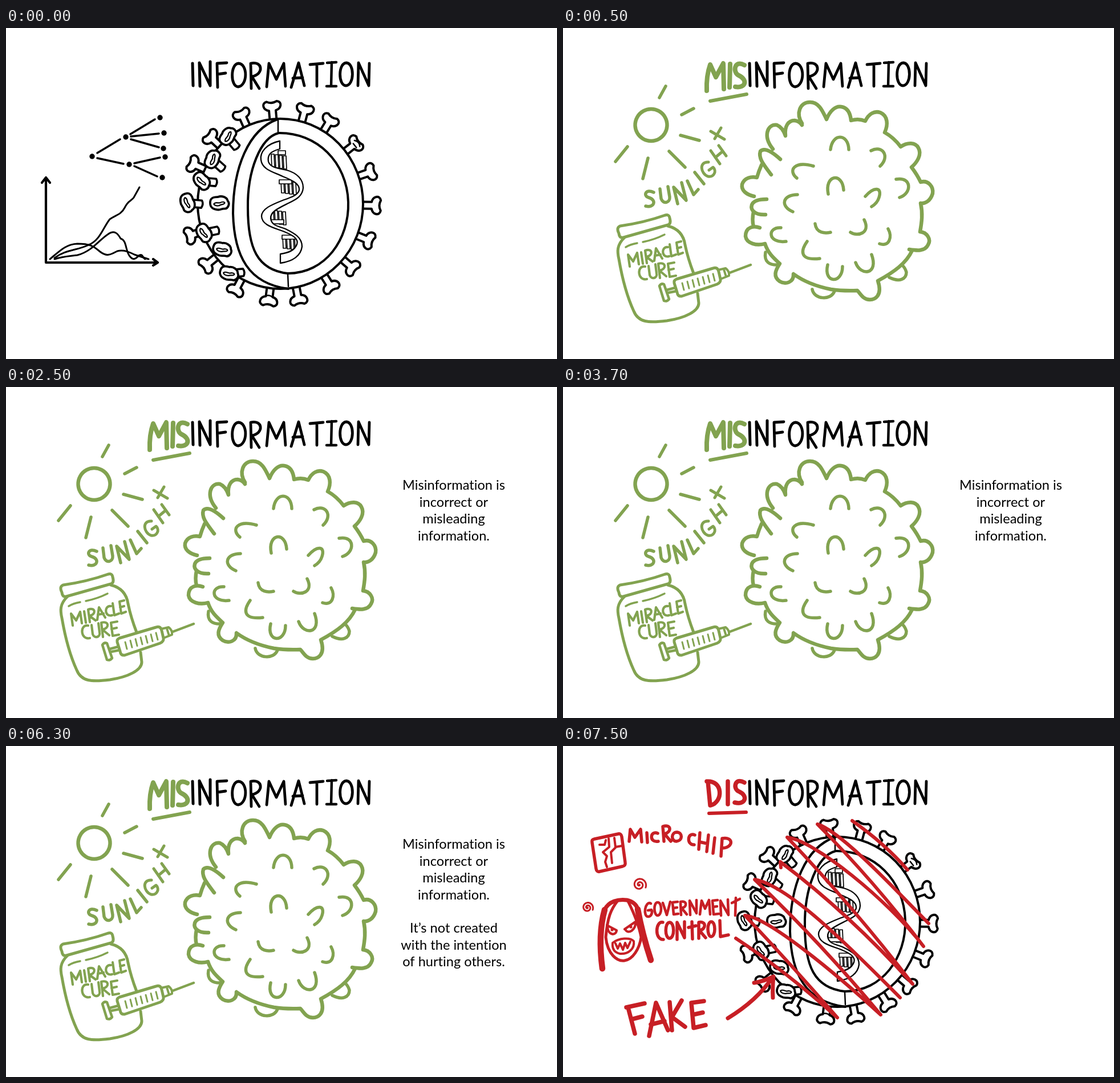
Animation, 966 px wide and 580 px high, one loop 8000 ms. Source, as an HTML page with a canvas:

```html
<!DOCTYPE html>
<html lang="en">
<head>
<meta charset="utf-8">
<title>Information, misinformation, disinformation</title>
<style>
html, body { margin: 0; width: 100%; height: 100%; overflow: hidden; background: #fff; }
canvas { display: block; width: 100vw; height: 100vh; }
</style>
</head>
<body>
<canvas id="stage" width="966" height="580" role="img" aria-label="Information, misinformation and disinformation about a virus"></canvas>
<script>
const ctx = document.getElementById('stage').getContext('2d');
const BLACK = '#000', GREEN = '#82a350', RED = '#c71f25';
const LOOP = 8000;

function ink(path, width, color = ctx.strokeStyle, filled = false) {
  const shape = new Path2D(path);
  ctx.strokeStyle = color;
  ctx.lineWidth = width;
  if (filled) {
    ctx.fillStyle = '#fff';
    ctx.fill(shape);
  }
  ctx.stroke(shape);
}

function placed(x, y, degrees, draw) {
  ctx.save();
  ctx.translate(x, y);
  ctx.rotate(degrees * Math.PI / 180);
  draw();
  ctx.restore();
}

function disc(x, y, r) {
  ctx.beginPath();
  ctx.arc(x, y, r, 0, 7);
  ctx.fill();
}

function spiral(x, y, r) {
  ctx.beginPath();
  for (let a = 0; a < 13; a += 0.2) {
    const d = r * a / 13;
    ctx.lineTo(x + d * Math.cos(a), y + d * Math.sin(a));
  }
  ctx.lineWidth = 3;
  ctx.stroke();
}

function title() {
  ink('M327 62L328 101M340 102L339 61 358 101 358 59', 5, BLACK);
  ink('M371 104L370 62 387 61M371 81L385 79', 4.8);
  ink('M408 62C393 62 393 103 407 103 424 101 424 63 408 62Z', 4.8);
  ink('M430 106L429 62C450 57 453 81 431 85L444 106', 4.8);
  ink('M457 103L461 62 474 90 487 62 490 102', 4.8);
  ink('M500 104L513 61 523 101M503 88L520 87', 4.8);
  ink('M533 64L556 62M545 63L545 102', 4.8);
  ink('M563 61L579 60M571 60L570 102M562 102L579 102', 4.4);
  ink('M597 61C582 61 582 101 596 101 611 100 611 62 597 61Z', 4.8);
  ink('M617 101L618 61 636 101 637 62', 4.8);
}

// Virus with a cutaway

const SPIKE = 'M-6 3L-6 -15C-16 -17 -19 -29 -9 -31Q0 -26 9 -31C19 -29 16 -17 6 -15L6 3';
const BEAN = 'M-16 2C-18 -7 -9 -9 -5 -10C0 -14 10 -14 13 -8C19 -4 17 6 11 7C6 8 5 12 -2 12C-10 13 -15 9 -16 2Z';
const CREASE = 'M-9 4C-7 -1 -3 1 1 -1C4 -4 8 -5 9 -3C8 1 3 1 1 4C-3 6 -7 6 -9 4Z';

function spike(degrees) {
  const a = degrees * Math.PI / 180;
  const x = 481 + 145 * Math.sin(a), y = 308 - 149 * Math.cos(a);
  placed(x, y, degrees, () => ink(SPIKE, 4, BLACK, true));
}

// A knob seen from the front; stem is the direction of its stalk, or null.
function knob(x, y, turn, stem) {
  if (stem !== null) placed(x, y, stem, () => ink('M0 -6L25 -6Q29 0 25 7L0 7', 3.6, BLACK, true));
  placed(x, y, turn, () => {
    ink(BEAN, 3.8, BLACK, true);
    ink(CREASE, 2.2);
  });
}

function rungs(x, y, count, height) {
  for (let i = 0; i < count; i++) {
    ink(`M${x + i * 7} ${y + i}l5 0 1 ${height}-5 0Z`, 1.7, BLACK, true);
  }
}

function helix() {
  rungs(465, 221, 4, 23);
  rungs(482, 267, 4, 22);
  rungs(464, 319, 4, 23);
  rungs(485, 364, 4, 22);
  ink('M477 215h13v7h-13ZM479 266h22v7h-22ZM462 336h25v7h-25ZM484 363h23v7h-23Z', 1.7, BLACK, true);
  ink('M480 198C456 203 445 218 447 231C449 248 468 252 485 260C505 268 515 274 514 284C512 293 499 297 485 302C465 310 448 317 448 330C449 346 470 350 488 357C505 364 513 370 510 379C506 390 495 394 481 396L481 412C503 409 517 399 519 383C519 367 506 360 490 352C476 347 466 346 464 334C463 322 477 316 495 307C510 300 520 294 521 280C521 265 510 254 492 249C475 246 463 244 460 234C458 222 464 216 480 212Z', 2.3, BLACK, true);
}

function cutawayVirus() {
  [-47, -66, -24, -5, 15, 31.5, 52, 71, 91, 112, 131, 148, 169, 187, 208, 231, 251].forEach(spike);
  placed(612, 205, 52, () => ink('M-7 -4Q0 -10 7 -5M-4 1L5 1', 2.5));
  placed(461, 468, 8, () => ink('M-7 3Q0 -2 7 3', 2.5));
  ink('M481 159A145 149 0 0 1 481 457A145 149 0 0 1 481 159Z', 4, BLACK, true);
  knob(389, 190, -38, 50);
  knob(362, 230, -48, 42);
  knob(343, 268, 65, 5);
  knob(318, 306, 88, 5);
  knob(374, 307, 15, null);
  knob(347, 359, 75, -12);
  knob(379, 388, 30, null);
  knob(391, 430, 30, -5);
  ink('M476 160C425 178 398 245 398 325C400 400 425 448 495 457', 4);
  ink('M478 184C446 192 423 250 424 315C424 385 440 424 494 430C560 430 602 370 600 305C598 235 545 183 478 184Z', 4);
  ink('M477 160L477 185M494 431L495 453', 2.5);
  helix();
}

function graphs() {
  ink('M70 263L70 411 266 411M63 271L70 262 77 271M258 405L266 411 258 416', 4.2, BLACK);
  ink('M85 403C105 388 125 390 145 380C165 372 170 350 182 335C192 328 202 327 208 315C214 302 220 303 224 297L234 279', 3);
  ink('M77 405C95 390 105 379 125 378C150 378 155 384 165 392C178 402 185 396 195 391C207 388 217 393 225 397Q240 402 250 405', 3);
  ink('M85 405C100 400 110 400 125 398C150 392 165 370 178 362C190 353 196 360 201 369C212 372 209 390 217 400C224 409 228 403 234 398C240 395 240 404 244 405', 3);
  ink('M160 219L200 195M160 228L206 238M218 186L261 160M219 190L268 185M219 195L268 209M225 237L270 227M225 242L265 260', 3.5);
  ctx.fillStyle = BLACK;
  [[151, 225], [210, 191], [216, 239], [270, 157], [277, 184], [276, 211], [279, 226], [274, 262]]
    .forEach(([x, y]) => disc(x, y, 4.7));
}

// Misinformation

function sun() {
  ink('M155 142A28 28 0 1 1 154 142Z', 6.5, GREEN);
  ink('M169 122L180 102M208 152L229 141M206 188L239 197M186 216L214 244M149 228L140 264M113 208L92 234', 5.5);
  ink('M159 288C145 281 140 294 150 297C165 301 160 316 145 312M170 282L172 299C176 310 188 306 187 296L184 278', 5.5);
  ink('M201 308L194 279 216 302 208 271M218 268L229 292 237 283M231 253L247 273', 5.5);
  ink('M255 235C238 234 241 255 254 260C265 262 270 250 263 244L256 249', 5);
  ink('M259 215L275 238M273 206L286 224M267 227L280 216M259 181L283 195M277 175L266 194', 5);
}

function jar() {
  ink('M100 347Q142 341 179 328Q186 326 187 333Q190 343 184 345L106 367Q99 369 98 360Q93 350 100 347Z', 5, GREEN);
  ink('M108 367C94 380 95 392 98 405C104 440 112 470 124 496C132 516 150 517 182 513C215 508 238 496 238 482L236 465M184 347C204 352 212 366 214 380Q219 404 229 430', 5);
  ink('M110 384Q118 379 130 377M140 375Q160 371 178 362', 3.5);
  ink('M117 418L114 397 123 409 130 394 133 414M137 393L140 413M147 412L144 390C157 385 159 399 146 401L157 409', 4.2);
  ink('M160 408L163 386 174 404M161 399L171 397M184 384C172 382 172 404 186 400M187 379L190 400 198 397', 4.2);
  ink('M207 374L199 376 202 397 210 394M200 386L207 384', 4.2);
  ink('M144 418C129 415 130 444 147 440M150 417L152 433C155 442 166 438 164 430L162 414', 4.2);
  ink('M170 438L167 413C181 409 182 423 169 425L181 435M195 411L184 413 187 436 198 434M185 424L194 422', 4.2);
}

function syringe() {
  ink('M169 452Q172 447 177 449L186 475Q182 480 177 478ZM182 459L197 455M184 464L199 461', 4.5, GREEN);
  ink('M199 440L263 421Q271 418 273 427L276 440Q277 446 270 449L208 470Q201 471 200 463L195 447Q194 442 199 440Z', 5, GREEN, true);
  ink('M272 424L285 421Q292 426 291 434L276 440M282 423L286 436', 4);
  ink('M292 429L329 415', 4.5);
  for (let i = 0; i < 7; i++) ink(`M${209 + i * 9} ${447 - i * 2.7}l3 12`, 3);
}

function lumpyVirus() {
  ink('M419 167C408 150 415 130 433 130C450 130 456 148 462 160C468 145 478 136 488 138C500 140 504 152 505 162Q518 158 530 163C536 150 546 145 556 148C570 154 570 170 564 183Q580 192 592 208C604 200 618 200 623 210C630 222 620 236 611 244Q621 257 627 270C640 266 650 278 648 290C644 304 634 308 627 307C631 325 629 340 626 357C638 358 646 370 640 380C634 392 620 390 607 388', 6.5, GREEN);
  ink('M612 390C602 412 580 428 552 443C561 470 546 476 538 476C526 476 522 466 516 460Q490 461 470 458Q430 450 404 431C405 446 390 450 380 444C368 436 372 425 380 413C368 402 360 395 354 378', 6.5);
  ink('M572 437C590 446 602 440 602 428Q600 420 594 415M437 458C440 476 470 478 476 461M355 393C352 410 362 416 378 415', 5.5);
  ink('M354 378C340 382 322 378 320 365C320 348 335 346 345 350M334 348Q331 336 334 322M355 327C338 328 328 320 331 310C334 302 346 300 357 300M335 295C322 292 312 285 314 274C318 262 330 260 340 262Q343 251 348 240', 6.5);
  ink('M365 257C352 240 342 228 346 216C354 208 370 220 381 230M368 212C350 190 358 168 375 170Q385 174 390 189C388 172 395 162 406 162Q414 163 419 170', 6.5);
  ink('M469 213C472 184 500 184 501 213M540 215C560 204 574 225 556 242M410 263C394 250 405 232 439 242M465 291C458 257 490 252 492 284', 5.5);
  ink('M530 295C545 278 560 278 554 297Q551 307 541 313M584 265C612 260 612 290 590 297M411 292C385 292 380 312 403 322M382 350C358 348 358 378 391 374', 5.5);
  ink('M442 343C444 360 460 360 469 358M528 336C540 360 516 366 504 358M570 352C578 366 572 384 555 378M428 374C418 388 412 408 450 404M464 415C456 448 490 449 490 418M513 411C522 436 554 432 541 397', 5.5);
}

function misinformation(t) {
  ink('M252 110Q251 84 258 64L268 86 281 62 282 107M293 63L292 104M318 65C300 55 297 78 308 83C325 91 320 106 302 103', 8, GREEN);
  ink('M258 128Q285 123 322 116', 6);
  sun();
  jar();
  syringe();
  lumpyVirus();
  if (t >= 2500) paragraph(180, 'Misinformation is', 'incorrect or', 'misleading', 'information.');
  if (t >= 4500) paragraph(327, 'It’s not created', 'with the intention', 'of hurting others.');
}

function paragraph(y, ...lines) {
  ctx.fillStyle = BLACK;
  ctx.font = '23.5px Lato, sans-serif';
  ctx.letterSpacing = '0.05px'; // keeps ligatures off
  ctx.textAlign = 'center';
  lines.forEach((line, i) => ctx.fillText(line, 785, y + i * 29.5));
}

// Disinformation

function microchip() {
  ink('M55 163L97 154Q102 153 103 159L109 204Q110 210 104 211L64 220Q59 221 58 215L51 169Q50 164 55 163Z', 5.5, RED);
  ink('M64 173L73 173 75 165M80 162L81 177 70 186 77 193 74 203 77 212M90 161L92 177 103 175M92 178L84 186 86 205', 4);
  ink('M116 167L118 146 126 160 136 146 138 168M147 152L148 169M166 153C153 147 150 170 167 167', 5.5);
  ink('M177 167L175 141C190 136 191 151 178 154L189 167M200 151C189 151 189 167 199 167C210 166 210 152 200 151Z', 5.5);
  ink('M231 156C218 150 216 174 230 173M240 152L238 181M255 156L252 185M239 168L253 171M266 161L263 188M277 193L279 162C299 158 300 178 279 179', 5.5);
}

function face() {
  spiral(134, 243, 12);
  spiral(43, 283, 10);
  ink('M69 390Q61 330 73 287M131 286Q139 330 154 375', 10.5, RED);
  ink('M73 287C80 272 97 268 112 270Q128 274 131 286', 7);
  ink('M96 271C84 286 78 300 75 335C78 365 95 378 108 376C122 374 134 356 137 335Q132 308 114 272', 5);
  ink('M77 314L94 323C93 333 79 332 78 317M108 321L127 308C129 321 114 332 109 321', 4.2);
  ink('M87 345C98 336 118 335 124 342C126 355 115 365 100 364C90 362 86 355 87 345ZM92 346L96 355 100 346 105 357 109 345 113 354 118 343', 4);
  ctx.fillStyle = RED;
  disc(86, 322, 2.6);
  disc(119, 317, 2.6);
}

function redWords() {
  ink('M154 276C144 270 139 300 150 299C156 298 157 290 155 287L149 288M166 274C158 274 159 297 166 297C174 296 174 274 166 274ZM175 275L182 296 188 273', 4.6, RED);
  ink('M201 273L192 274 194 295 202 294M193 284L200 283M207 296L206 273C218 270 218 283 208 284L217 295M223 296L222 271 234 293 234 270', 4.6);
  ink('M240 295L243 271 249 285 256 270 258 295M271 270L262 271 264 295 273 294M263 282L270 281M277 297L276 271 290 296 289 269M303 266L302 297M296 275L310 268', 4.6);
  ink('M175 309C162 306 160 340 176 339M187 309C178 309 178 337 187 337C196 336 196 310 187 309ZM200 339L200 309 213 336 213 308', 5.5);
  ink('M226 308L227 338M220 318L233 315M238 337L238 309C252 306 251 322 239 323L250 336M260 308C252 308 252 334 260 334C268 333 268 308 260 308ZM275 306L276 334 290 331', 5.5);
  ink('M114 458L126 504M111 458L143 451M120 479L139 474M151 508L163 450 184 498M154 488L178 482', 7.5);
  ink('M187 449L191 498M208 446L191 475 214 492M225 450L229 494 250 489M225 450L247 447M227 471L245 467', 7.5);
}

// Each turn on the left is rounded: the upper stroke bows, the lower one runs straight.
function scribble() {
  ink('M507 131Q563 170 604 217M641 311C600 270 490 150 446 137Q545 236 632 351C570 270 440 165 393 160Q510 283 613 417Q502 294 381 203L382 213', 6, RED);
  ink('M591 441C520 370 400 245 336 234Q455 348 557 471C480 400 360 300 319 297Q402 385 481 476Q390 394 303 337', 6);
}

function disinformation() {
  cutawayVirus();
  ink('M254 62L258 104M252 62C281 60 281 98 259 104M289 62L289 102M318 64C301 54 297 76 309 80C325 87 320 104 301 99', 7.5, RED);
  ink('M256 118L321 116', 6);
  microchip();
  face();
  redWords();
  scribble();
  ink('M289 477C320 458 346 437 366 407M335 415Q353 412 369 404Q367 424 368 441', 7);
}

function draw(t) {
  ctx.fillStyle = '#fff';
  ctx.fillRect(0, 0, 966, 580);
  ctx.lineCap = ctx.lineJoin = 'round';
  title();
  if (t < 500) {
    graphs();
    cutawayVirus();
  } else if (t < 7500) {
    misinformation(t);
  } else {
    disinformation();
  }
}

const start = performance.now();
function tick() {
  draw((performance.now() - start) % LOOP);
  requestAnimationFrame(tick);
}
tick();
</script>
</body>
</html>
```
